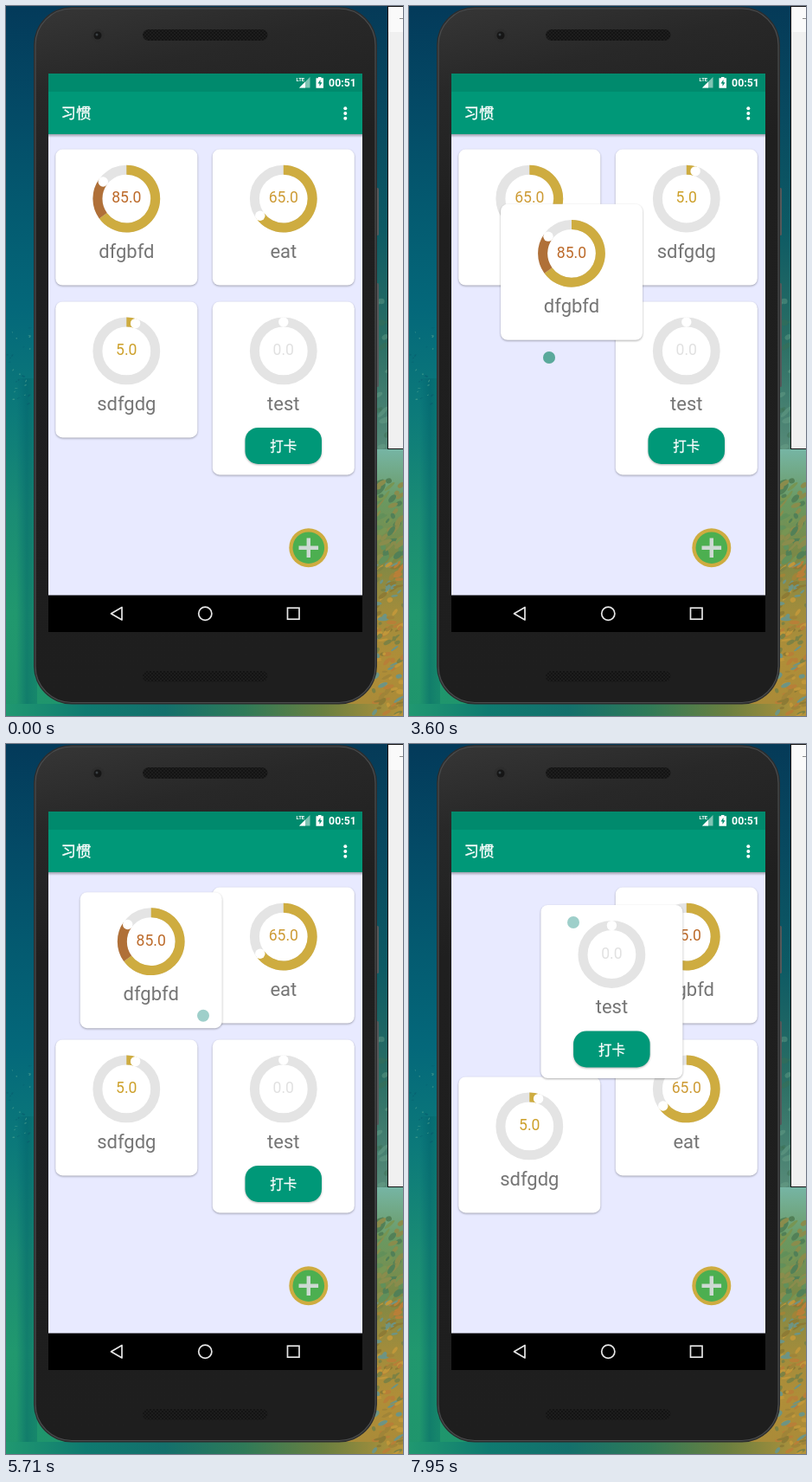
These frames come from a looping animation (459x820 px, 8000 ms). An HTML page with a canvas:

```html
<!DOCTYPE html>
<html lang="zh-CN">
<head>
<meta charset="utf-8">
<title>习惯</title>
<style>
  html, body { margin: 0; width: 100%; height: 100%; overflow: hidden; background: #0b5060; }
  canvas, svg { position: absolute; left: 0; top: 0; width: 459px; height: 820px; }
  text { font-family: Roboto, "Noto Sans CJK SC", "Noto Sans CJK", sans-serif; }
  .mid { text-anchor: middle; }
  .name { font-size: 22px; fill: #757575; }
  .value { font-size: 17.6px; }
  .han { fill: #fff; stroke: #fff; stroke-width: .3px; font-weight: 500; }
  .card { filter: drop-shadow(0 1.2px .8px rgba(0, 0, 0, .32)); }
  .button { fill: #009878; filter: drop-shadow(0 1px .8px rgba(0, 0, 0, .3)); }
</style>
</head>
<body>
<canvas id="wall" width="459" height="820"></canvas>
<svg viewBox="0 0 459 820">
  <defs>
    <linearGradient id="body" x1="0" x2=".12" y1="0" y2="1">
      <stop offset="0" stop-color="#363636"/><stop offset=".12" stop-color="#282828"/>
      <stop offset=".3" stop-color="#1f1f1f"/><stop offset="1" stop-color="#1e1e1e"/>
    </linearGradient>
    <linearGradient id="drop" x1="0" x2="0" y1="0" y2="1">
      <stop offset="0" stop-color="#000" stop-opacity=".32"/><stop offset="1" stop-color="#000" stop-opacity="0"/>
    </linearGradient>
    <pattern id="mesh" width="4" height="4" patternUnits="userSpaceOnUse">
      <rect width="4" height="4" fill="#141414"/>
      <circle cx="1" cy="1" r=".7" fill="#2c2c2c"/><circle cx="3" cy="3" r=".7" fill="#2c2c2c"/>
    </pattern>
    <clipPath id="list"><rect x="49" y="157" width="363" height="524"/></clipPath>
  </defs>

  <!-- phone -->
  <rect x="427" y="210" width="4" height="55" rx="1.5" fill="#55585a"/>
  <rect x="427" y="320" width="4" height="120" rx="1.5" fill="#55585a"/>
  <rect x="32" y="1" width="397" height="805.5" rx="44" fill="#2c2d2e"/>
  <rect x="34" y="3" width="393" height="801.5" rx="42" fill="url(#body)" stroke="#4a4c4d" stroke-width="1.2"/>
  <circle cx="106" cy="34" r="7.5" fill="#2d2d2d"/>
  <circle cx="106" cy="34" r="4.5" fill="#161616"/>
  <circle cx="105" cy="33" r="1.5" fill="#3c4145"/>
  <rect x="158" y="27" width="144.5" height="13" rx="6.5" fill="url(#mesh)"/>
  <rect x="158" y="768" width="144.5" height="12.5" rx="6.2" fill="url(#mesh)"/>

  <!-- screen -->
  <rect x="49" y="78" width="363" height="645" fill="#e8eaff"/>
  <rect x="49" y="148" width="363" height="4" fill="url(#drop)"/>
  <rect x="49" y="78" width="363" height="21" fill="#008a6d"/>
  <rect x="49" y="99" width="363" height="49" fill="#009878"/>
  <text x="335.5" y="87" font-size="6" font-weight="700" fill="#fff">LTE</text>
  <path d="M339 94.500L351.500 82V94.500Z" fill="#7fc4b4"/>
  <path d="M339 94.500L346 87.500V94.500Z" fill="#fff"/>
  <path d="M361 82h3.500v1.300h2.500v11.500h-8.500V83.300h2.500Z" fill="#fff"/>
  <path d="M363.500 85l-3 4.600h2v3.200l3-4.600h-2Z" fill="#008a6d"/>
  <text x="404.8" y="93.2" font-size="12.3" font-weight="700" fill="#fff" text-anchor="end">00:51</text>
  <text class="han" x="63.5" y="130.3" font-size="17.4">习惯</text>
  <g fill="#fff"><circle cx="392.3" cy="118.3" r="2"/><circle cx="392.3" cy="124" r="2"/><circle cx="392.3" cy="129.7" r="2"/></g>

  <g clip-path="url(#list)">
    <circle id="under" r="7" fill="#91c2b4"/>
    <g id="cards"></g>
  </g>

  <circle cx="349.8" cy="625.7" r="22.5" fill="#ceac40"/>
  <circle cx="349.8" cy="625.7" r="18.3" fill="#4caf50"/>
  <path d="M338.500 625.700h22.600M349.800 614.400v22.600" stroke="#cdd9d3" stroke-width="4.4"/>
  <circle id="over" r="7" fill="#008273" fill-opacity=".38"/>

  <rect x="49" y="680.5" width="363" height="42.500" fill="#000"/>
  <g fill="none" stroke="#e6e6e6" stroke-width="1.7">
    <path d="M121.500 701.700L134 694.500V709Z" stroke-linejoin="round"/>
    <circle cx="230.3" cy="701.7" r="7.6"/>
    <rect x="325.5" y="695.2" width="13.5" height="13"/>
  </g>

  <!-- window beside the phone -->
  <rect x="441.5" y=".5" width="20" height="511" fill="#f0f0f0" stroke="#111"/>
  <rect x="442" y="1" width="17" height="29" fill="#fafafa"/>
  <path d="M455 14.500h5" stroke="#8a8a8a"/>
</svg>

<script>
const LOOP = 8000, LEFT = 57.3, RIGHT = 238.8, TOP = 165.6, GAP = 18.8;
const $ = id => document.getElementById(id);
const clamp = v => Math.max(0, Math.min(1, v));
const ease = v => (v = clamp(v), v * v * (3 - 2 * v));

// ---- wallpaper ----
let seed = 7;
const rnd = () => (seed = (seed * 16807) % 2147483647) / 2147483647;
const g = $('wall').getContext('2d');

// Evenly spaced colours, downwards or to the right
function fade(x, y, w, h, colors, across) {
  const grad = g.createLinearGradient(x, y, across ? x + w : x, across ? y : y + h);
  colors.forEach((c, i) => grad.addColorStop(i / (colors.length - 1), c));
  g.fillStyle = grad;
  g.fillRect(x, y, w, h);
}
function strokes(n, x, y, w, h, size, colors) {
  for (let i = 0; i < n; i++) {
    g.fillStyle = colors[Math.floor(rnd() * colors.length)];
    g.beginPath();
    g.ellipse(x + rnd() * w, y + rnd() * h, size * (.4 + rnd()), size * (.2 + rnd() * .4), -1 + rnd(), 0, 7);
    g.fill();
  }
}
fade(0, 0, 230, 820, ['#033a5a', '#044a66', '#045a70', '#04687a', '#0c7a7a', '#1a8c74', '#21986e', '#1f956c']);
fade(12, 430, 24, 390, ['rgba(0,95,110,0)', 'rgba(0,95,105,.45)', 'rgba(10,115,105,.4)'], true);
fade(230, 0, 229, 512, ['#053a58', '#084a60', '#0d5a64', '#2a6e64', '#568a78']);
fade(230, 512, 229, 308, ['#76b5a4', '#6a9860', '#7c8846', '#a08c3c', '#b08e38', '#a88a38']);
fade(0, 806, 459, 14, ['#209870', '#0f7a70', '#14706c', '#2f7a58', '#6a7f40', '#b5933a'], true);
strokes(26, 0, 370, 30, 90, 1.5, ['rgba(120,190,160,.4)', 'rgba(10,85,105,.5)']);
strokes(14, 428, 330, 14, 180, 6, ['rgba(110,165,140,.4)', 'rgba(60,110,80,.4)']);
strokes(60, 428, 545, 34, 100, 6, ['#62905a', '#779553', '#528057', '#8a8c4c']);
strokes(130, 420, 645, 40, 175, 5, ['#c0973a', '#a08438', '#7d8244', '#8d7b35', '#b87f38', '#6d9484']);

// ---- cards ----
function arc(from, to, color) {
  const r = 33.4, p = f => {
    const a = f * 2 * Math.PI;
    return `${82 + r * Math.sin(a)} ${57 - r * Math.cos(a)}`;
  };
  return `<path d="M${p(from)}A${r} ${r} 0 ${to - from > .5 ? 1 : 0} 1 ${p(to)}" fill="none" stroke="${color}" stroke-width="11"/>`;
}
function makeCard(name, pct, ink, button) {
  const el = document.createElementNS('http://www.w3.org/2000/svg', 'g');
  const a = pct / 50 * Math.PI, height = button ? 200 : 157;
  el.setAttribute('class', 'card');
  el.innerHTML = `<rect class="face" width="164" height="${height}" rx="8" fill="#fff"/>
    <circle cx="82" cy="57" r="33.4" fill="none" stroke="#e4e4e4" stroke-width="11"/>
    ${pct ? arc(0, Math.min(pct, 65) / 100, '#ceac40') : ''}${pct > 65 ? arc(.65, pct / 100, '#b07038') : ''}
    <circle cx="${82 + 33.4 * Math.sin(a)}" cy="${57 - 33.4 * Math.cos(a)}" r="5.7" fill="#fff"/>
    <text class="mid value" x="82" y="61.8" fill="${ink}">${pct.toFixed(1)}</text>
    <text class="mid name" x="82" y="125.3">${name}</text>
    ${button ? `<rect class="button" x="37.700" y="145.500" width="88.500" height="42" rx="15"/>
    <text class="mid han" x="82" y="172.5" font-size="15.5">打卡</text>` : ''}`;
  $('cards').appendChild(el);
  return { el, height, face: el.querySelector('.face'), label: el.querySelector('.name') };
}
const cards = {
  e: makeCard('eat', 65, '#cd9b35'),
  s: makeCard('sdfgdg', 5, '#cda02a'),
  t: makeCard('test', 0, '#e1e1e1', true),
  d: makeCard('dfgbfd', 85, '#bc6a2a')
};

// ---- motion ----
// Every reorder slides the cards to their new slots
const orders = [[0, 'dest'], [3050, 'estd'], [3290, 'esdt'], [3890, 'estd'], [4462, 'edst'], [4600, 'dest'], [7640, 'tdse']];

function slot(order, key) {
  const i = order.indexOf(key);
  return [i % 2 ? RIGHT : LEFT, i < 2 ? TOP : TOP + cards[order[i - 2]].height + GAP];
}
function settled(key, t) {
  const pos = slot(orders[0][1], key);
  for (let i = 1; i < orders.length; i++) {
    const was = slot(orders[i - 1][1], key), now = slot(orders[i][1], key);
    const f = ease((t - orders[i][0]) / 300);
    pos.forEach((_, k) => pos[k] += (now[k] - was[k]) * f);
  }
  return pos;
}

// Key points are [time, x, y]
const gestures = [
  { key: 'd', press: 1250, lift: 6270, from: 2490, to: 5890,
    drag: [[2490, LEFT, TOP], [2650, 61.6, 189.8], [2780, 89, 224], [2960, 247, 314], [3600, 106, 228.8], [3750, 109, 306],
      [4150, 247, 330], [4500, 105.7, 126.3], [4850, 49, 152], [5100, 56.4, 164.6], [5460, 181, 209], [5790, 50, 157], [5890, LEFT, TOP]],
    finger: [[2490, 158, 286], [2650, 162, 310], [2960, 345, 432], [3600, 162, 406], [4150, 335, 440], [4500, 229, 438],
      [4850, 180, 260], [5100, 305, 293], [5460, 300, 350], [5890, 171, 285], [6270, 126, 235]] },
  { key: 't', press: 6505, lift: LOOP, from: 7080, to: LOOP,
    drag: [[7080, RIGHT, TOP + 157 + GAP], [7200, 49, 337], [7350, 158, 210], [7650, 49, 160], [7950, 152.4, 186]],
    finger: [[7080, 317, 398], [7200, 150, 395], [7950, 190, 206]] }
];

function along(path, t) {
  const i = path.findIndex(k => k[0] > t);
  if (i < 1) return path[i ? path.length - 1 : 0].slice(1);
  const a = path[i - 1], b = path[i], f = (t - a[0]) / (b[0] - a[0]);
  return [a[1] + (b[1] - a[1]) * f, a[2] + (b[2] - a[2]) * f];
}
const place = (el, [x, y]) => el.setAttribute('transform', `translate(${x} ${y})`);
const mix = (a, b, f) => `rgb(${a.map((v, i) => Math.round(v + (b[i] - v) * f))})`;

function draw(t) {
  // The screen refreshes slowly while cards are being dragged about
  const step = t > 2900 && t < 5100 || t > 7000 ? 150 : 50;
  const q = Math.floor(t / step) * step;
  const now = gestures[t < 6400 ? 0 : 1], held = cards[now.key];

  for (const key in cards) {
    const dragged = key === now.key && q >= now.from && q < now.to;
    place(cards[key].el, dragged ? along(now.drag, q) : settled(key, q));
  }
  if ($('cards').lastChild !== held.el) $('cards').appendChild(held.el);

  const since = t - now.press;
  const flash = clamp(Math.min(since / 40, (335 - since) / 250));
  held.face.setAttribute('fill', mix([255, 255, 255], [80, 168, 110], flash));
  held.label.style.fill = mix([117, 117, 117], [62, 104, 50], flash);

  for (const id of ['under', 'over']) {
    place($(id), along(now.finger, q));
    $(id).setAttribute('visibility', t >= now.press && t < now.lift ? 'visible' : 'hidden');
  }
}

const start = performance.now();
function frame() {
  draw((performance.now() - start) % LOOP);
  requestAnimationFrame(frame);
}
frame();
</script>
</body>
</html>
```
